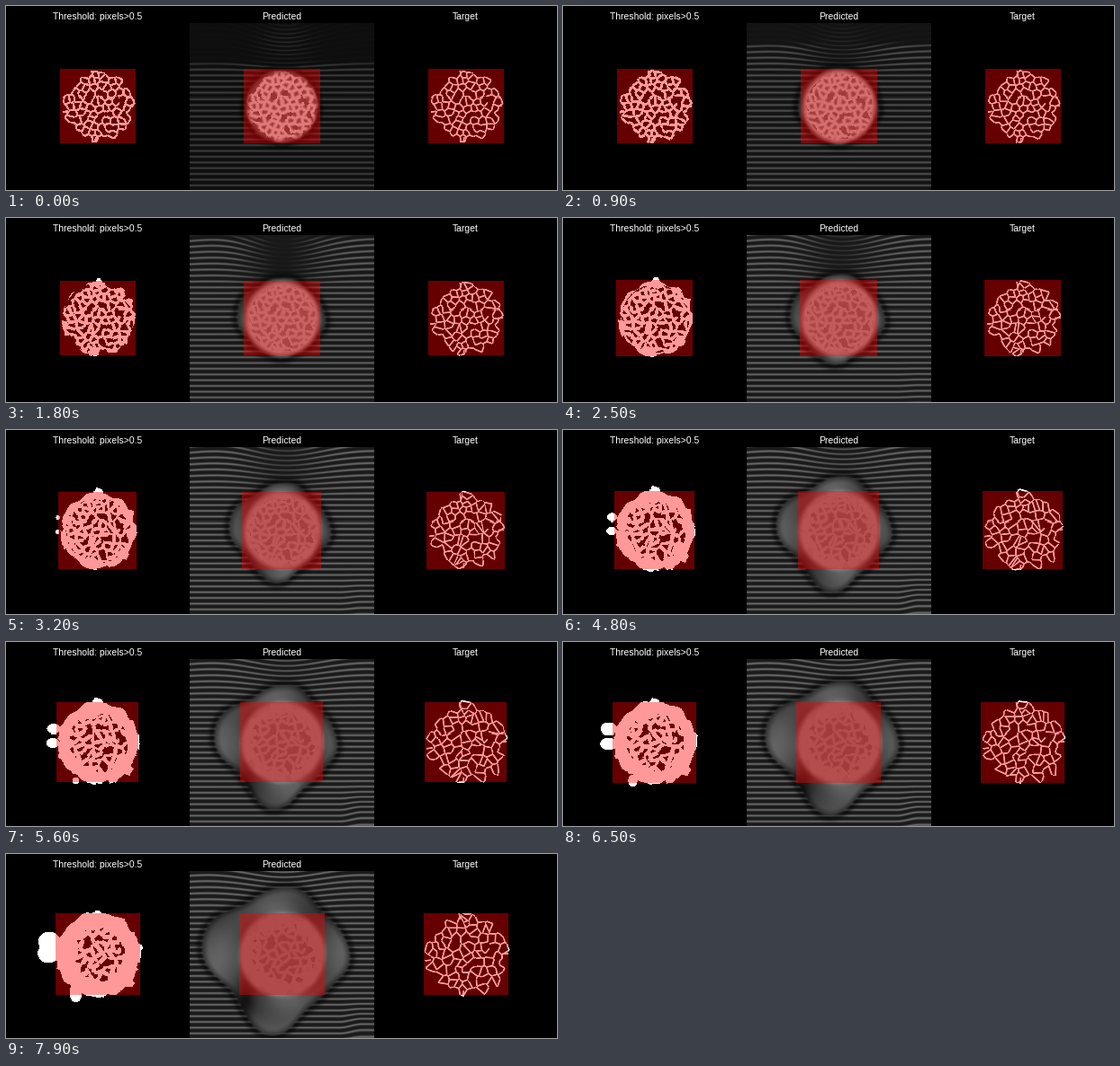
A matplotlib script that plays this animation: 612x205 px, repeating every 8 s.

```python
import numpy as np
import matplotlib.pyplot as plt
from matplotlib.animation import FuncAnimation

W, H, PANEL, TOP = 612, 205, 204, 20
FRAMES, INTERVAL = 80, 100
KEYS = [0, 18, 32, 41, 56, 65, 79]
CX, CY = 102, 112

Y, X = np.mgrid[0:H, 0:PANEL].astype(float)
RADIUS = np.hypot(X - CX, Y - CY)
ANGLE = np.arctan2(Y - CY, X - CX)

# Cell centres: a jittered hexagonal lattice, wider than the colony itself
rng = np.random.default_rng(12)
rows, cols = np.mgrid[-7:8, -7:8]
cells = np.stack([(cols + 0.5 * (rows % 2)) * 8.0, rows * 7.1], -1).reshape(-1, 2)
cells += rng.uniform(-2.5, 2.5, cells.shape)
cells = cells[np.hypot(*cells.T) < 51]
inside = np.hypot(*cells.T) < 35.5
drift = rng.uniform(0, 2 * np.pi, cells.shape)


def key(i, *values):
    return np.interp(i, KEYS, values)


def smooth(v):
    v = np.clip(v, 0, 1)
    return v * v * (3 - 2 * v)


def bump(v, centre, width):
    return np.exp(-((v - centre) / width) ** 2)


def ellipse(x, y, rx, ry):
    return ((X - x) / rx) ** 2 + ((Y - y) / ry) ** 2 < 1


def wall_distance(i):
    """Distance of each pixel to the nearest cell wall."""
    scale = key(i, 37, 37.5, 38.5, 39.5, 41.5, 42, 43) / 37
    sway = 1.6 * (np.sin(drift + i * 0.06) - np.sin(drift))
    points = cells * scale + sway
    area = (slice(60, 166), slice(50, 156))
    px, py = X[area] - CX, Y[area] - CY
    d2 = (px[..., None] - points[:, 0]) ** 2 + (py[..., None] - points[:, 1]) ** 2
    near = np.argpartition(d2, 1, axis=-1)[..., :2]
    pair = np.take_along_axis(d2, near, -1)
    a, b = near[..., 0], near[..., 1]
    gap = np.hypot(*np.moveaxis(points[a] - points[b], -1, 0))
    dist = np.abs(pair[..., 1] - pair[..., 0]) / (2 * gap)
    missing = (a * b * 0.618 + (a + b) * 0.377) % 1 < 0.09
    dist[~(inside[a] | inside[b]) | (missing & inside[a] & inside[b])] = 99
    out = np.full(X.shape, 99.0)
    out[area] = dist
    # short hairs sticking out of the rim
    for angle in (-1.75, -0.03, 3.0, 1.65):
        along = (X - CX) * np.cos(angle) + (Y - CY) * np.sin(angle)
        across = np.abs((Y - CY) * np.cos(angle) - (X - CX) * np.sin(angle))
        hair = (along > 34 * scale) & (along < 40 * scale)
        out = np.where(hair, np.minimum(out, across), out)
    return out


def rim_excess(i):
    limit = key(i, 50, 34, 31, 30, 28, 27, 25)
    return 0.35 * np.maximum(0, RADIUS - limit)


def threshold(i, dist):
    half = key(i, 1.15, 1.8, 2.15, 2.25, 2.4, 2.5, 2.55)
    mask = dist < half + rim_excess(i)
    edge = key(i, 0, 39, 41, 42, 44, 45, 46)
    edge = edge + 1.2 * np.sin(7 * ANGLE + 0.03 * i) + 0.9 * np.sin(13 * ANGLE + 1)
    limit = key(i, 50, 34, 31, 30, 28, 27, 25)
    if i > 8:
        mask |= (RADIUS < edge) & (RADIUS > limit + 5)
    tip = 57 - 0.42 * (i - 26)
    if tip < 57:
        mid, half_w = (tip + 59) / 2, (59 - tip) / 2
        tall = key(i, 2, 2, 3, 4, 5.5, 7, 11)
        mask |= ellipse(mid + 0.5, key(i, 98, 98, 98, 98, 97, 97, 98), half_w, tall)
        mask |= ellipse(mid, key(i, 112, 112, 113, 112, 112, 113, 110), half_w, tall)
    if i > 50:
        size = (i - 50) / 29
        mask |= ellipse(77, 154, 3 + 4 * size, 2 + 9 * size)
    return 255.0 * mask


def stripes(i):
    column = bump(X, CX, 42)
    above = np.maximum(0, 78 - Y)
    warp = -0.35 * key(i, 1, 0.8, 0.4, 0.3, 0.25, 0.2, 0.2) * column * above
    warp += 0.05 * above * np.sin(X / 27 + 0.01 * i)
    warp += key(i, 0, 0, 2, 4, 4, 4, 4) * smooth((X - 165) / 25) * bump(Y, 190, 20)
    wave = 0.5 + 0.5 * np.cos(2 * np.pi * (Y + warp - 1) / 6.4)
    level = key(i, 64, 22, 5, 0, 0, 0, 0)
    amount = 0.06 + 0.94 * smooth((Y - level) / 8 + 0.5)
    amount *= 1 - key(i, 0.3, 0.95, 0.5, 0.3, 0.2, 0.1, 0) * bump(X, CX, 36) * (Y < 76)
    if i < 18:
        arcs = bump(X, 106, 30) * bump(Y, 42, 22) * (1 - i / 18)
        amount = np.maximum(amount, 0.6 * arcs)
    base = key(i, 14, 24, 26, 26, 26, 26, 26)
    return base + key(i, 46, 72, 78, 78, 78, 78, 78) * amount * wave ** 2.5


def flower_radius(i):
    base = key(i, 40, 42, 46, 48, 54, 58, 63)
    lobes = [
        (0.0, 0.5, key(i, 40, 49, 55, 57, 62, 67, 76)),
        (1.75, 0.45, key(i, 40, 44, 59, 65, 75, 82, 91)),
        (3.32, 0.6, key(i, 40, 50, 59, 65, 76, 83, 90)),
        (-1.48, 0.5, key(i, 40, 46, 54, 58, 65, 69, 76)),
    ]
    radius = base + 0.7 * np.sin(9 * ANGLE)
    for angle, width, reach in lobes:
        turn = (ANGLE - angle + np.pi) % (2 * np.pi) - np.pi
        radius = radius + (reach - base) * bump(turn, 0, width)
    return radius


def predicted(i, dist):
    grey = stripes(i)
    outer = flower_radius(i)
    depth = outer - np.hypot(X - CX + 1, Y - CY)
    shade = 76 + 14 * np.cos(4 * ANGLE + 0.4) + 9 * np.sin(RADIUS / 9 + 2 * ANGLE)
    shade = shade * (0.62 + 0.38 * smooth(depth / 9))
    pocket = bump(X, 61, 10) * bump(Y, 163, 20)
    shade = shade * (1 - key(i, 0, 0, 0.2, 0.3, 0.55, 0.6, 0.65) * pocket)
    cover = smooth(depth / 4 + 0.3)
    grey = grey * (1 - 0.45 * bump(depth, -2, 4)) * (1 - cover) + shade * cover

    blur = key(i, 1.9, 1.7, 1.6, 1.6, 1.6, 1.6, 1.6)
    net = np.exp(-(np.maximum(0, dist - rim_excess(i) - 0.5) / blur) ** 2)
    hole = key(i, 85, 115, 108, 106, 102, 100, 96)
    line = key(i, 205, 168, 145, 140, 134, 130, 126)
    net = np.where((RADIUS > 36) & (i > 8), np.maximum(net, 0.75), net)
    disc = smooth((key(i, 42, 44, 46, 47, 49, 50, 51) - RADIUS) / 8)
    grey = grey * (1 - disc) + (hole + (line - hole) * net) * disc
    grey[:TOP] = 0
    return grey


def render(i):
    dist = wall_distance(i)
    target = 255 * np.clip((1.2 - dist) * 1.6, 0, 1)
    grey = np.hstack([threshold(i, dist), predicted(i, dist), target])
    rgb = np.repeat(grey[..., None], 3, axis=2)
    left, right, top, bottom = (int(round(v)) for v in (
        key(i, 60, 60, 58, 57, 56, 55, 55),
        key(i, 144, 144, 145, 146, 147, 148, 149),
        key(i, 71, 71, 70, 69, 68, 68, 67),
        key(i, 153, 153, 155, 155, 156, 157, 157)))
    for offset in range(0, W, PANEL):
        box = rgb[top:bottom, offset + left:offset + right]
        box *= 0.6
        box[..., 0] += 102
    return np.clip(rgb, 0, 255).astype(np.uint8)


plt.rcParams["font.family"] = "Liberation Sans"
# the small margin keeps the pixel size from being rounded down
fig = plt.figure(figsize=((W + 0.01) / 100, (H + 0.01) / 100), dpi=100, facecolor="black")
ax = fig.add_axes([0, 0, 1, 1])
ax.axis("off")
image = ax.imshow(render(0), extent=(0, W, H, 0), aspect="auto", interpolation="nearest")
for n, title in enumerate(("Threshold: pixels>0.5", "Predicted", "Target")):
    ax.text(PANEL * (n + 0.5), 15, title, color="white", fontsize=7.5,
            ha="center", va="baseline")


def update(i):
    image.set_data(render(i))
    return [image]


anim = FuncAnimation(fig, update, frames=FRAMES, interval=INTERVAL,
                     repeat=True, repeat_delay=0)
plt.show()
```
